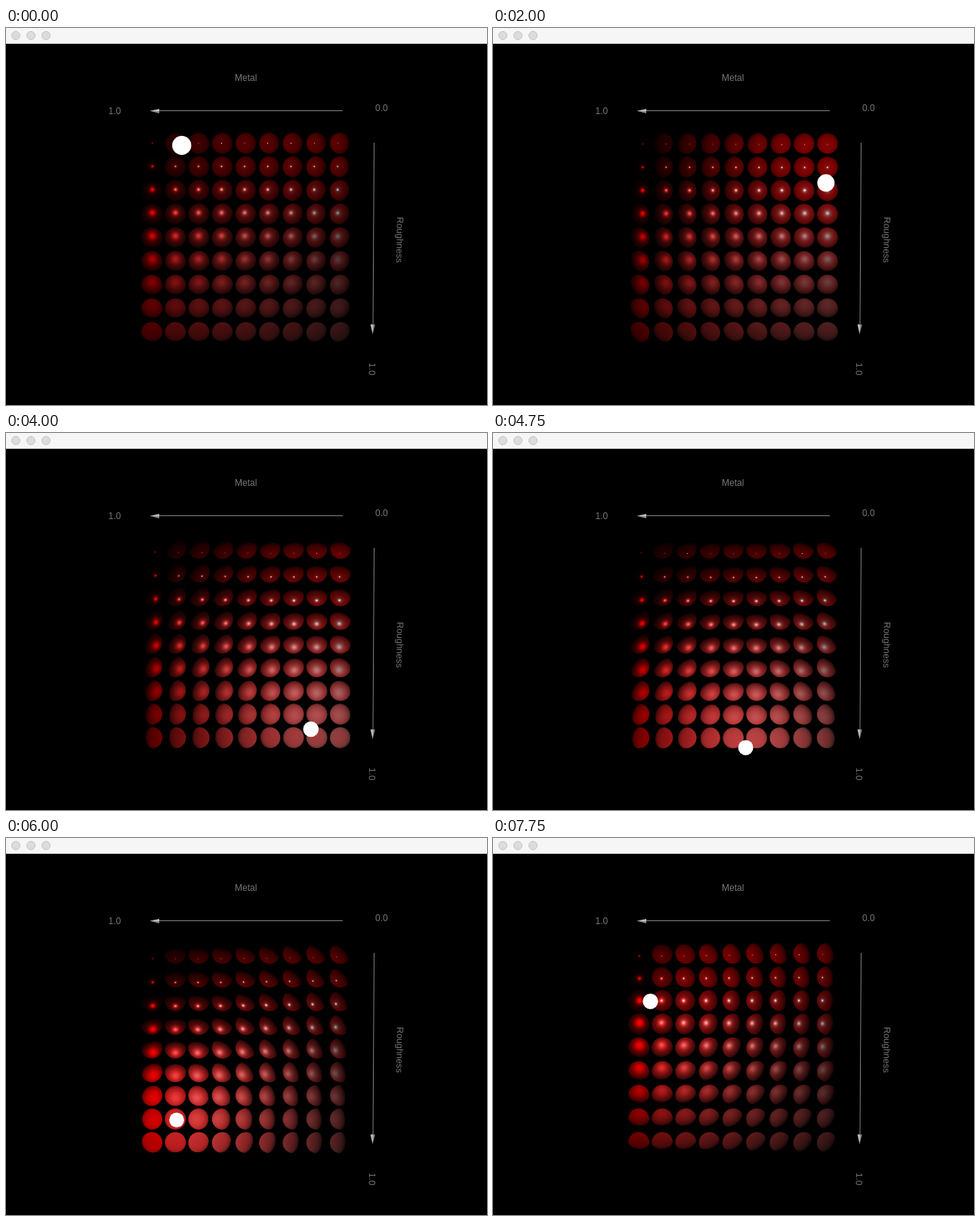
An HTML page with a canvas for the animation above (8 s loop, 637x499 px).

```html
<!DOCTYPE html>
<html lang="en">
<head>
<meta charset="utf-8">
<title>Metal and roughness</title>
<style>
  html, body { margin: 0; width: 100%; height: 100%; overflow: hidden; background: #000; }
  canvas, svg { position: absolute; left: 0; top: 0; display: block; }
  text { font: 12px "Liberation Sans", Arial, sans-serif; fill: #767676; }
</style>
</head>
<body>
<canvas id="stage" width="637" height="499"></canvas>
<svg width="637" height="499" viewBox="0 0 637 499">
  <rect width="637" height="20" fill="#f6f6f6"/>
  <rect y="20" width="637" height="1" fill="#d4d4d4"/>
  <g fill="#dcdcdc" stroke="#c6c6c6">
    <circle cx="13" cy="10" r="5.5"/><circle cx="33" cy="10" r="5.5"/><circle cx="53" cy="10" r="5.5"/>
  </g>
  <path d="M446 109.5H202M487.5 152L486 393" stroke="#808080" fill="none"/>
  <path d="M190.5 109.8L203 107V113Z" fill="#8c8c8c"/>
  <path d="M190.5 109.8L203 107.5V110Z" fill="#c4c4c4"/>
  <path d="M485.6 405L482.5 392.5H488.7Z" fill="#8c8c8c"/>
  <path d="M485.6 405L483.2 392.5H485.8Z" fill="#c4c4c4"/>
  <text x="303" y="70">Metal</text>
  <text x="135.5" y="114">1.0</text>
  <text x="489" y="110">0.0</text>
  <text transform="translate(518 250) rotate(91)">Roughness</text>
  <text transform="translate(481 443) rotate(91)">1.0</text>
</svg>
<script>
const ctx = document.getElementById('stage').getContext('2d');
const LOOP = 8000, STEP = 250;
const COUNT = 9, RADIUS = 14, REACH = 15;
const GRID = { x: 193, y: 152.5, dx: 31.25, dy: 31.35 };
const EYE = [318.5, 260, 680];
const ORBIT = 115.3, POWER = 10800, GLOSS = 0.7, REFLECTANCE = 0.09;
const BOX = { x: 176, y: 136, w: 286, h: 284 };
const image = ctx.createImageData(BOX.w, BOX.h);

const dot = (a, b) => a[0] * b[0] + a[1] * b[1] + a[2] * b[2];
const cross = (a, b) => [
  a[1] * b[2] - a[2] * b[1], a[2] * b[0] - a[0] * b[2], a[0] * b[1] - a[1] * b[0]
];
const unit = v => { const n = Math.hypot(...v); return v.map(c => c / n); };
const mix = (a, b, k) => a + (b - a) * k;
const tone = c => 255 * Math.sqrt(c / (1 + c));

// The light circles the grid while drifting towards and away from the camera.
function lightAt(t) {
  const reach = 148.5 - 21.3 * Math.cos(0.4 * (t - 6));
  const angle = (-121.9 + 43.2 * t) * Math.PI / 180;
  const x = 319.5 + reach * Math.cos(angle);
  const y = EYE[1] + reach * (0.212 + Math.sin(angle));
  const scale = ORBIT / reach;
  return {
    x, y, r: reach * 0.077,
    pos: [mix(EYE[0], x, scale), mix(EYE[1], y, scale), EYE[2] * (1 - scale)]
  };
}

function drawSphere(col, row, light) {
  const cx = GRID.x + col * GRID.dx, cy = GRID.y + row * GRID.dy;
  const metal = 1 - col / (COUNT - 1), rough = row / (COUNT - 1);
  const toLight = [light[0] - cx, light[1] - cy, light[2]];
  const energy = POWER / dot(toLight, toLight);

  // Work in axes that face the camera, so that the view direction is +z.
  const view = unit([EYE[0] - cx, EYE[1] - cy, EYE[2]]);
  const right = unit(cross([0, 1, 0], view));
  const L = unit([right, cross(view, right), view].map(axis => dot(axis, toLight)));
  const H = unit([L[0], L[1], L[2] + 1]);

  const alpha2 = Math.max(rough, 0.05) ** 4;
  const k = (rough + 1) ** 2 / 8;
  const base = REFLECTANCE * (1 - metal);
  const diffuse = (1 - metal) * (1 - 0.5 * rough);

  for (let py = Math.floor(cy - REACH); py <= cy + REACH; py++) {
    for (let px = Math.floor(cx - REACH); px <= cx + REACH; px++) {
      const x = (px + 0.5 - cx) / RADIUS, y = (py + 0.5 - cy) / RADIUS;
      const d = Math.hypot(x, y);
      const cover = Math.min(1, (1 - d) * RADIUS + 0.5);
      if (cover <= 0) continue;
      const fit = d > 0.995 ? 0.995 / d : 1;
      const N = [x * fit, y * fit, Math.sqrt(1 - (d * fit) ** 2)];
      const nl = dot(N, L), nv = N[2], nh = dot(N, H);
      if (nl <= 0) continue;
      const lobe = alpha2 / (nh * nh * (alpha2 - 1) + 1) ** 2;
      const shade = 1 / ((nv * (1 - k) + k) * (nl * (1 - k) + k));
      const spec = GLOSS * lobe * shade * nl * energy;
      const red = diffuse * nl * energy + spec * (metal + base);
      const i = ((py - BOX.y) * BOX.w + px - BOX.x) * 4;
      image.data[i] = tone(red) * cover;
      image.data[i + 1] = image.data[i + 2] = tone(spec * base) * cover;
    }
  }
}

function draw(t) {
  const light = lightAt(t);
  for (let i = 0; i < image.data.length; i += 4) {
    image.data[i] = image.data[i + 1] = image.data[i + 2] = 0;
    image.data[i + 3] = 255;
  }
  for (let row = 0; row < COUNT; row++)
    for (let col = 0; col < COUNT; col++) drawSphere(col, row, light.pos);

  ctx.fillStyle = '#000';
  ctx.fillRect(0, 0, 637, 499);
  ctx.putImageData(image, BOX.x, BOX.y);
  ctx.fillStyle = '#fff';
  ctx.beginPath();
  ctx.arc(light.x, light.y, light.r, 0, 2 * Math.PI);
  ctx.fill();
}

const start = performance.now();
let shown = -1;
function tick() {
  const step = Math.floor(((performance.now() - start) % LOOP) / STEP);
  if (step !== shown) {
    shown = step;
    draw(step * STEP / 1000);
  }
  requestAnimationFrame(tick);
}
tick();
</script>
</body>
</html>
```
